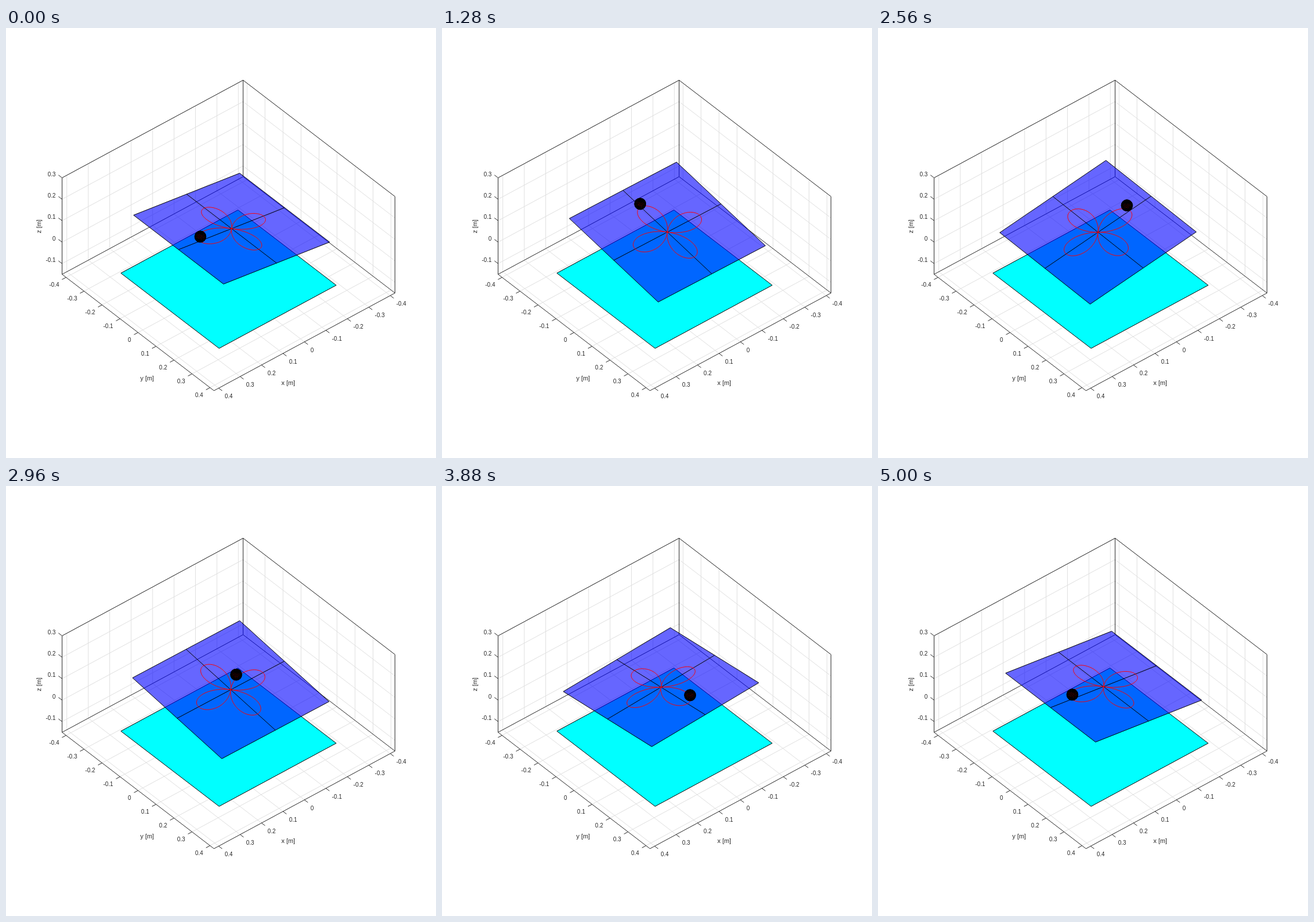
Write an HTML page with a canvas that moves like this. It is 748 px wide and 748 px high and loops after 5040 ms.

```html
<!DOCTYPE html>
<html>
<head>
<meta charset="utf-8">
<title>Ball on plate</title>
<style>
html, body { margin: 0; width: 100%; height: 100%; overflow: hidden; background: #fff; }
canvas { display: block; }
</style>
</head>
<body>
<canvas id="stage" width="748" height="748"></canvas>
<script>
const ctx = document.getElementById('stage').getContext('2d');
const TAU = 2 * Math.PI, { sin, cos } = Math;
const FRAME = 40, FRAMES = 126;
const LIMIT = 0.422, FLOOR = -0.15, TOP = 0.3;
const PLATE = 0.25, PIVOT_HEIGHT = 0.1, ROSE = 0.15, BALL = 0.02;
const INK = '#262626', GRID = '#dfdfdf';

// Orthographic view, azimuth 140 degrees, elevation 40 degrees
const SCALE = 487, C = cos(TAU / 9), S = sin(TAU / 9);
const VIEW = [S * C, C * C, S];
const project = ([x, y, z]) => [
  387.1 + SCALE * (S * y - C * x),
  388.8 + SCALE * (S * S * x + S * C * y - C * z)
];

const dot = (a, b) => a[0] * b[0] + a[1] * b[1] + a[2] * b[2];
const cross = (a, b) => [
  a[1] * b[2] - a[2] * b[1],
  a[2] * b[0] - a[0] * b[2],
  a[0] * b[1] - a[1] * b[0]
];

function trace(points, { stroke, fill, close = false, width = 1 }) {
  ctx.beginPath();
  for (const p of points) ctx.lineTo(...project(p));
  if (close) ctx.closePath();
  if (fill) { ctx.fillStyle = fill; ctx.fill(); }
  ctx.lineWidth = width;
  ctx.strokeStyle = stroke;
  ctx.stroke();
}

function label(text, x, y, align, size = 10) {
  ctx.font = size + 'px "Liberation Sans", Arial, sans-serif';
  ctx.textAlign = align;
  ctx.textBaseline = 'middle';
  ctx.fillStyle = INK;
  ctx.fillText(text, x, y);
}

function tick(point, dx, dy, value, textX, textY, align) {
  const [x, y] = project(point);
  ctx.beginPath();
  ctx.moveTo(x, y);
  ctx.lineTo(x + dx, y + dy);
  ctx.strokeStyle = INK;
  ctx.stroke();
  label(String(value), x + textX, y + textY, align);
}

function drawAxes() {
  const L = LIMIT, grid = { stroke: GRID }, axis = { stroke: INK };
  for (let i = -4; i <= 4; i++) {
    const v = i / 10;
    trace([[v, L, FLOOR], [v, -L, FLOOR], [v, -L, TOP]], grid);
    trace([[L, v, FLOOR], [-L, v, FLOOR], [-L, v, TOP]], grid);
  }
  for (let i = -1; i <= 3; i++) trace([[L, -L, i / 10], [-L, -L, i / 10], [-L, L, i / 10]], grid);

  for (const z of [FLOOR, TOP]) trace([[L, -L, z], [-L, -L, z], [-L, L, z]], axis);
  for (const [x, y] of [[L, -L], [-L, -L], [-L, L]]) trace([[x, y, FLOOR], [x, y, TOP]], axis);
  trace([[L, -L, FLOOR], [L, L, FLOOR], [-L, L, FLOOR]], axis);

  for (let i = -4; i <= 4; i++) {
    const v = i / 10;
    tick([v, L, FLOOR], 6, 4.6, v, 10.5, 15, 'left');
    tick([L, v, FLOOR], -7, 3.8, v, -12, 13.5, 'right');
    if (i >= -1 && i <= 3) tick([L, -L, v], -6.3, -4.8, v, -11.2, -5.5, 'right');
  }
  label('x [m]', 491, 617.5, 'center', 11);
  label('y [m]', 245.5, 609.5, 'center', 11);
  ctx.save();
  ctx.translate(58, 345);
  ctx.rotate(-TAU / 4);
  label('z [m]', 0, 0, 'center', 11);
  ctx.restore();
}

const square = (half, place) =>
  [[-1, -1], [1, -1], [1, 1], [-1, 1]].map(([a, b]) => place(a * half, b * half));

const rose = a => [ROSE * cos(2 * a) * cos(a), ROSE * cos(2 * a) * sin(a)];

function drawBall(center, u, v, n) {
  const [x, y] = project(center);
  ctx.beginPath();
  ctx.arc(x, y, BALL * SCALE, 0, TAU);
  ctx.fillStyle = '#f00';
  ctx.fill();
  ctx.lineWidth = 1.2;
  ctx.strokeStyle = '#000';
  ctx.stroke();

  const surface = (lon, lat) => {
    const a = cos(lat) * cos(lon), b = cos(lat) * sin(lon), c = sin(lat);
    return u.map((_, i) => a * u[i] + b * v[i] + c * n[i]);
  };
  const step = TAU / 20;
  const edge = (p, q) => {
    if (dot(p, VIEW) < 0 || dot(q, VIEW) < 0) return;
    for (const [i, d] of [p, q].entries()) {
      const point = project(d.map((w, j) => center[j] + BALL * w));
      i ? ctx.lineTo(...point) : ctx.moveTo(...point);
    }
  };
  ctx.beginPath();
  for (let i = 0; i < 20; i++) {
    for (let j = -5; j < 5; j++) {
      const lon = i * step, lat = j * step;
      for (const row of [lat, lat + step / 2]) {
        edge(surface(lon, row), surface(lon, row + step / 2));
        edge(surface(lon, row), surface(lon + step, row));
      }
    }
  }
  ctx.stroke();
}

function draw(phase) {
  ctx.fillStyle = '#fff';
  ctx.fillRect(0, 0, 748, 748);
  drawAxes();
  trace(square(0.273, (x, y) => [x, y, -0.129]), { fill: '#0ff', stroke: '#000', close: true });

  // Tilt that accelerates the ball along the rose
  const tiltX = 0.1265 * cos(3 * phase) + 0.0166 * cos(phase);
  const tiltY = 0.1265 * sin(3 * phase) - 0.0166 * sin(phase);
  const u = [cos(tiltX), 0, sin(tiltX)];
  const v = [-sin(tiltY) * sin(tiltX), cos(tiltY), sin(tiltY) * cos(tiltX)];
  const n = cross(u, v);
  const onPlate = (a, b, lift = 0) =>
    u.map((_, i) => a * u[i] + b * v[i] + (PIVOT_HEIGHT + lift) * n[i]);

  trace(square(PLATE, onPlate), { fill: 'rgba(0,0,255,0.6)', stroke: '#000', close: true });
  trace([onPlate(-PLATE, 0), onPlate(PLATE, 0)], { stroke: '#000' });
  trace([onPlate(0, -PLATE), onPlate(0, PLATE)], { stroke: '#000' });
  const curve = Array.from({ length: 200 }, (_, i) => onPlate(...rose(i * TAU / 200)));
  trace(curve, { stroke: '#f00', close: true });
  drawBall(onPlate(...rose(phase), BALL), u, v, n);
}

function loop() {
  const step = Math.floor(performance.now() / FRAME) % FRAMES;
  draw(TAU * step / (FRAMES - 1));
  requestAnimationFrame(loop);
}
loop();
</script>
</body>
</html>
```
